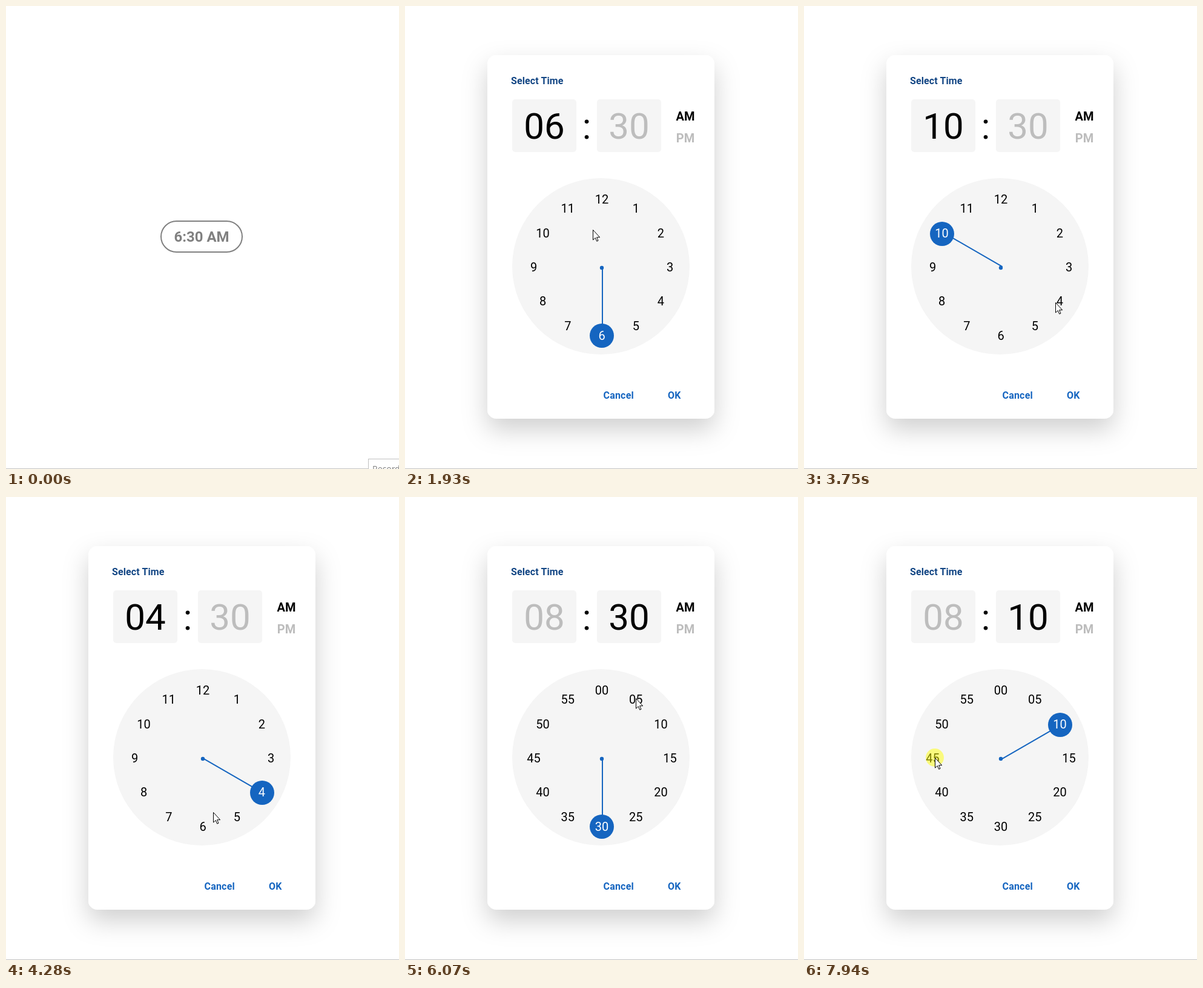
These frames come from a looping animation (649x764 px, 8 s). An HTML page:

```html
<!DOCTYPE html>
<html lang="en">
<head>
<meta charset="utf-8">
<title>Time picker</title>
<style>
  html, body { margin: 0; width: 100%; height: 100%; overflow: hidden; background: #fff; }
  svg { display: block; width: 649px; height: 764px; font-family: Roboto, sans-serif; }
  .mid { text-anchor: middle; }
  .bold { font-weight: 700; }
  .num { font-size: 20px; }
  .big { font-size: 60px; }
</style>
</head>
<body>
<svg viewBox="0 0 649 764">
  <defs>
    <filter id="shadow" x="-40%" y="-30%" width="180%" height="160%">
      <feDropShadow dx="0" dy="18" stdDeviation="21" flood-color="#000" flood-opacity=".19"/>
    </filter>
  </defs>
  <rect width="649" height="764" fill="#fff"/>
  <rect x="256" y="355" width="134" height="51" rx="25.5" fill="#fff" stroke="#808080" stroke-width="2"/>
  <text class="mid bold" x="323" y="389" font-size="24" fill="#808080">6:30 AM</text>

  <g id="dialog">
    <rect x="136" y="81" width="375" height="600" rx="15" fill="#fff" filter="url(#shadow)"/>
    <text class="bold" x="175" y="128.5" font-size="16" letter-spacing=".12" fill="#134684">Select Time</text>
    <g fill="#f5f5f5">
      <rect x="177" y="154" width="106" height="87" rx="5"/>
      <rect x="317" y="154" width="106" height="87" rx="5"/>
      <ellipse cx="323.5" cy="429.5" rx="146.5" ry="145.5"/>
    </g>
    <text class="mid big" id="hour" x="230" y="219"></text>
    <text class="mid big" x="300" y="219">:</text>
    <text class="mid big" id="minute" x="370" y="219"></text>
    <text class="mid bold num" x="463" y="189">AM</text>
    <text class="mid bold num" x="463" y="225" fill="#bdbdbd">PM</text>
    <g fill="#1565c0">
      <line id="hand" stroke="#1565c0" stroke-width="2"/>
      <circle cx="325" cy="432" r="3.2"/>
      <circle id="knob" r="20"/>
      <g class="bold" font-size="16" letter-spacing=".2">
        <text x="327.5" y="648">Cancel</text>
        <text x="434" y="648">OK</text>
      </g>
    </g>
    <g id="labels" class="mid num"></g>
  </g>

  <rect y="763" width="649" height="1" fill="#c3c3c3"/>
  <g id="tip">
    <rect x="598.5" y="747.5" width="80" height="30" fill="#fff" stroke="#c0c0c0"/>
    <text x="605" y="769" font-size="14" fill="#808080" style="font-family:'Open Sans',sans-serif">Record</text>
  </g>
  <circle id="press" r="15" fill="#ff0" fill-opacity=".49"/>
  <path id="cursor" d="M.5 .5V17L4.3 13.5L6.7 19.2L9 18.2L6.6 12.7H11.7Z" fill="#fff" stroke="#000" stroke-linejoin="round"/>
</svg>
<script>
const $ = id => document.getElementById(id);
const LOOP = 8000, TICK = 200 / 3;
const CX = 325, CY = 431.5, R = 112.5;
const ENTER = 5;

// Times are in ticks
const move = (from, to, x, y) => ({ from, to, x, y });
const click = (down, up, change) => ({ down, up, change });

const moves = [
  move(ENTER, 15, 293, 387),
  move(28, 29, 310, 369),
  move(29, 33, 328, 322),
  move(35, 40, 286, 343),
  move(40, 43, 243, 377),
  move(48, 57, 421, 493),
  move(59, 61, 425, 483),
  move(61, 64, 342, 520),
  move(64, 69, 226, 488),
  move(74, 83, 344, 211),
  move(87, 91, 381, 332),
  move(91, 99, 428, 485),
  move(102, 108, 427, 365),
  move(110, 116, 216, 430)
];
const clicks = [
  click(16, 18),
  click(34, 35, { hour: 12 }),
  click(46, 47, { hour: 10 }),
  click(58, 59, { hour: 4 }),
  click(71, 72, { hour: 8 }),
  click(84, 85, { minuteMode: true }),
  click(101, 102, { minute: 20 }),
  click(109, 110, { minute: 10 }),
  click(119, 120)
];

const clamp = v => Math.max(0, Math.min(1, v));
const ease = u => u * u * (3 - 2 * u);
const two = v => String(v).padStart(2, '0');

function set(el, attrs) {
  for (const k in attrs) el.setAttribute(k, attrs[k]);
}

function direction(i) {
  const a = i * Math.PI / 6;
  return [Math.sin(a), -Math.cos(a)];
}

const labels = Array.from({ length: 12 }, (_, i) => {
  const el = document.createElementNS('http://www.w3.org/2000/svg', 'text');
  const [dx, dy] = direction(i);
  set(el, { x: CX + R * dx, y: Math.floor(CY + R * dy + .01) + 7 });
  return $('labels').appendChild(el);
});

function pointer(n) {
  let x = 582, y = 750;
  for (const m of moves) {
    const u = ease(clamp((n - m.from) / (m.to - m.from)));
    x += (m.x - x) * u;
    y += (m.y - y) * u;
  }
  return [x, y];
}

function stateAt(n) {
  const state = { hour: 6, minute: 30, minuteMode: false };
  for (const c of clicks) if (c.up <= n) Object.assign(state, c.change);
  return state;
}

function draw(t) {
  const n = Math.floor((t + 14) / TICK) % 120;
  const [x, y] = pointer(n);
  const { hour, minute, minuteMode } = stateAt(n);
  const picked = (minuteMode ? minute / 5 : hour) % 12;
  const [dx, dy] = direction(picked);
  const down = clicks.some(c => n >= c.down && n < c.up);

  set($('tip'), { opacity: clamp(1 - n / 2) });
  set($('dialog'), { opacity: clamp((n - 17) / 4) });
  set($('cursor'), { transform: `translate(${Math.round(x)} ${Math.round(y)})`, opacity: n < ENTER ? 0 : 1 });
  set($('press'), { cx: x, cy: y, opacity: down ? 1 : 0 });

  $('hour').textContent = two(hour);
  $('minute').textContent = two(minute);
  set($('hour'), { fill: minuteMode ? '#bdbdbd' : '#000' });
  set($('minute'), { fill: minuteMode ? '#000' : '#bdbdbd' });

  // The hand turns about a point one pixel beside its axis
  const hx = 327 - dy, hy = 431 + dx;
  set($('hand'), { x1: hx, y1: hy, x2: hx + dx * 100, y2: hy + dy * 100 });
  set($('knob'), { cx: Math.ceil(CX + R * dx - .01), cy: Math.ceil(CY + R * dy - .01) });
  labels.forEach((el, i) => {
    el.textContent = minuteMode ? two(i * 5) : i || 12;
    set(el, { fill: i === picked ? '#fff' : '#000' });
  });
}

const start = performance.now();
function frame() {
  draw((performance.now() - start) % LOOP);
  requestAnimationFrame(frame);
}
draw(0);
requestAnimationFrame(frame);
</script>
</body>
</html>
```
